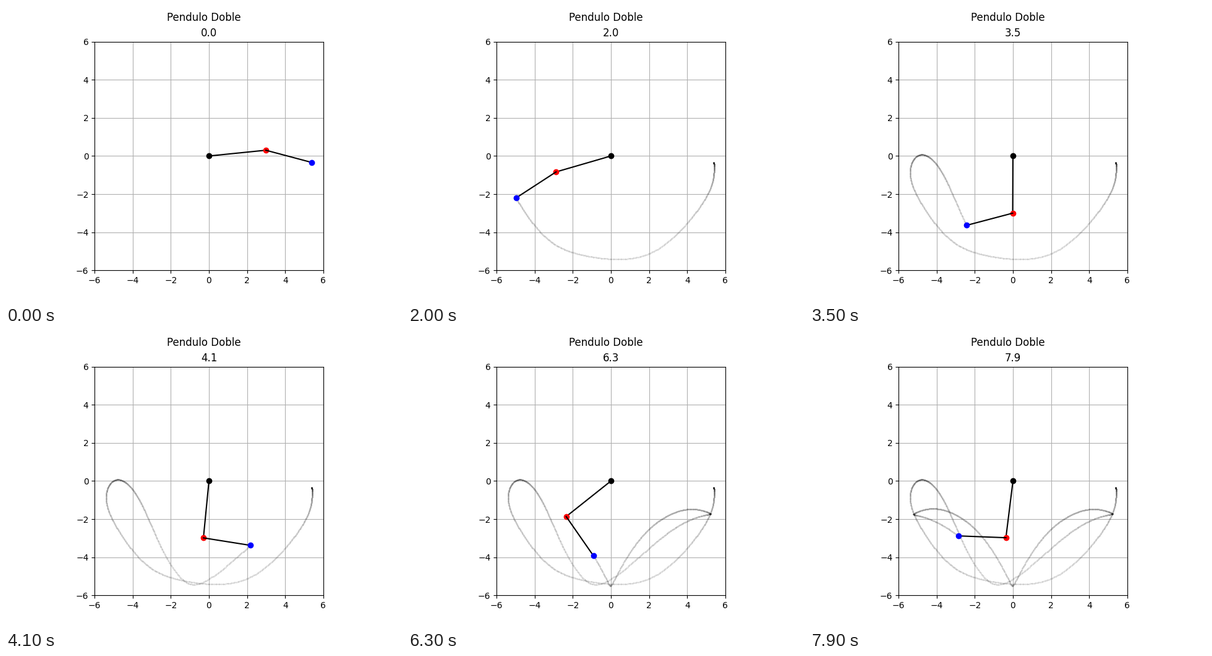
A matplotlib script for the animation above (8 s loop, 640 px wide and 480 px high).

```python
import numpy as np
import matplotlib.pyplot as plt
from matplotlib.animation import FuncAnimation

L1, L2 = 3.0, 2.5
LOOP, FRAMES = 8.0, 80
DT = 0.005
PER_FRAME = round(LOOP / FRAMES / DT)

# Waypoints of the swing: time, then x and y of the inner and outer bob.
_ = np.nan
MARKS = np.array([
    (0.9, _, _, 3.69, -3.905),
    (1.2, 0.81, -2.88, 0.97, -5.38),
    (1.8, _, _, -4.15, -3.48),
    (2.7, _, _, -4.70, _),
    (2.8, -2.50, -1.64, -4.43, -0.08),
    (3.6, _, _, -1.91, -4.555),
    (4.1, -0.29, -2.99, 2.18, -3.36),
    (4.5, _, _, 4.57, _),
    (5.1, 2.89, 0.79, 3.86, -1.51),
    (5.4, _, _, _, -2.185),
    (6.3, -2.37, -1.85, -0.94, -3.92),
    (7.2, _, _, -4.60, _),
    (7.9, -0.39, -2.975, -2.89, -2.84),
])
KNOWN = ~np.isnan(MARKS[:, 1:])

# Parameters: log mass ratio, gravity, two start angles, two start speeds.
GUESS = np.array([0, 9.81, np.radians(95), np.radians(75), 0, 0])
SPREAD = np.array([5, 0.02, 0.008, 0.012, 0.01, 0.01])


def rates(s, mu, g):
    a, b, p, q = s
    sd, cd = np.sin(a - b), np.cos(a - b)
    ga, gb = g * np.sin(a), g * np.sin(b)
    pull = L1 * p * p
    acc1 = (mu * cd * gb - (1 + mu) * ga
            - mu * sd * (L2 * q * q + cd * pull)) / (L1 * (1 + mu * sd * sd))
    acc2 = (pull * sd - gb - L1 * acc1 * cd) / L2
    return np.array([p, q, acc1, acc2])


def swing(params, dt):
    """Integrate the double pendulum (RK4) for each column of params."""
    mu, g, s = np.exp(params[0]), params[1], params[2:]
    path = [s]
    for _step in range(round(LOOP / dt)):
        k1 = rates(s, mu, g)
        k2 = rates(s + dt / 2 * k1, mu, g)
        k3 = rates(s + dt / 2 * k2, mu, g)
        k4 = rates(s + dt * k3, mu, g)
        s = s + dt / 6 * (k1 + 2 * k2 + 2 * k3 + k4)
        path.append(s)
    return np.array(path)


def bobs(path):
    a, b = path[:, 0], path[:, 1]
    x1, y1 = L1 * np.sin(a), -L1 * np.cos(a)
    return np.stack([x1, y1, x1 + L2 * np.sin(b), y1 - L2 * np.cos(b)], axis=1)


def misfit(params):
    dt = 0.01
    at = bobs(swing(params, dt))[np.rint(MARKS[:, 0] / dt).astype(int)]
    gap = (at - MARKS[:, 1:, None])[KNOWN] / 0.02
    drift = (params - GUESS[:, None]) / SPREAD[:, None]
    return np.vstack([gap, drift])


def pick(params):
    return params[:, np.nanargmin((misfit(params) ** 2).sum(axis=0))]


def fit():
    """Coarse search over the mass ratio, then damped least squares."""
    ratio, tilt = np.meshgrid(np.linspace(-2, 2, 321),
                              np.radians([-1, -0.5, 0, 0.5, 1]))
    grid = np.repeat(GUESS[:, None], ratio.size, axis=1)
    grid[0] = ratio.ravel()
    grid[3] += tilt.ravel()
    best = pick(grid)
    h, n = 1e-5, len(GUESS)
    nudge = np.hstack([np.zeros((n, 1)), h * np.eye(n)])
    for _round in range(7):
        r = misfit(best[:, None] + nudge)
        jac = (r[:, 1:] - r[:, :1]) / h
        normal, grad = jac.T @ jac, jac.T @ r[:, 0]
        damp = np.diag(np.diag(normal))
        tries = [best - np.linalg.solve(normal + k * damp, grad)
                 for k in (0, 0.01, 0.1, 1, 10, 100)]
        best = pick(np.stack([best] + tries, axis=1))
    return best


with np.errstate(all="ignore"):
    x1, y1, x2, y2 = bobs(swing(fit()[:, None], DT))[:, :, 0].T

fig, ax = plt.subplots(figsize=(6.4, 4.8), dpi=100)
fig.suptitle("Pendulo Doble")
ax.set(xlim=(-6, 6), ylim=(-6, 6), aspect="equal")
ax.grid(True)
title = ax.set_title("0.0")

trail, = ax.plot([], [], "ko", ms=0.1)
rod1, = ax.plot([], [], "k-", lw=1.5)
ax.plot([0], [0], "ko")
inner, = ax.plot([], [], "ro")
rod2, = ax.plot([], [], "k-", lw=1.5)
outer, = ax.plot([], [], "bo")


def draw(frame):
    i = frame * PER_FRAME
    trail.set_data(x2[:i + 1], y2[:i + 1])
    rod1.set_data([0, x1[i]], [0, y1[i]])
    rod2.set_data([x1[i], x2[i]], [y1[i], y2[i]])
    inner.set_data([x1[i]], [y1[i]])
    outer.set_data([x2[i]], [y2[i]])
    title.set_text(f"{frame * LOOP / FRAMES:.1f}")
    return trail, rod1, inner, rod2, outer, title


anim = FuncAnimation(fig, draw, frames=FRAMES, interval=1000 * LOOP / FRAMES,
                     repeat=True, repeat_delay=0)
plt.show()
```
